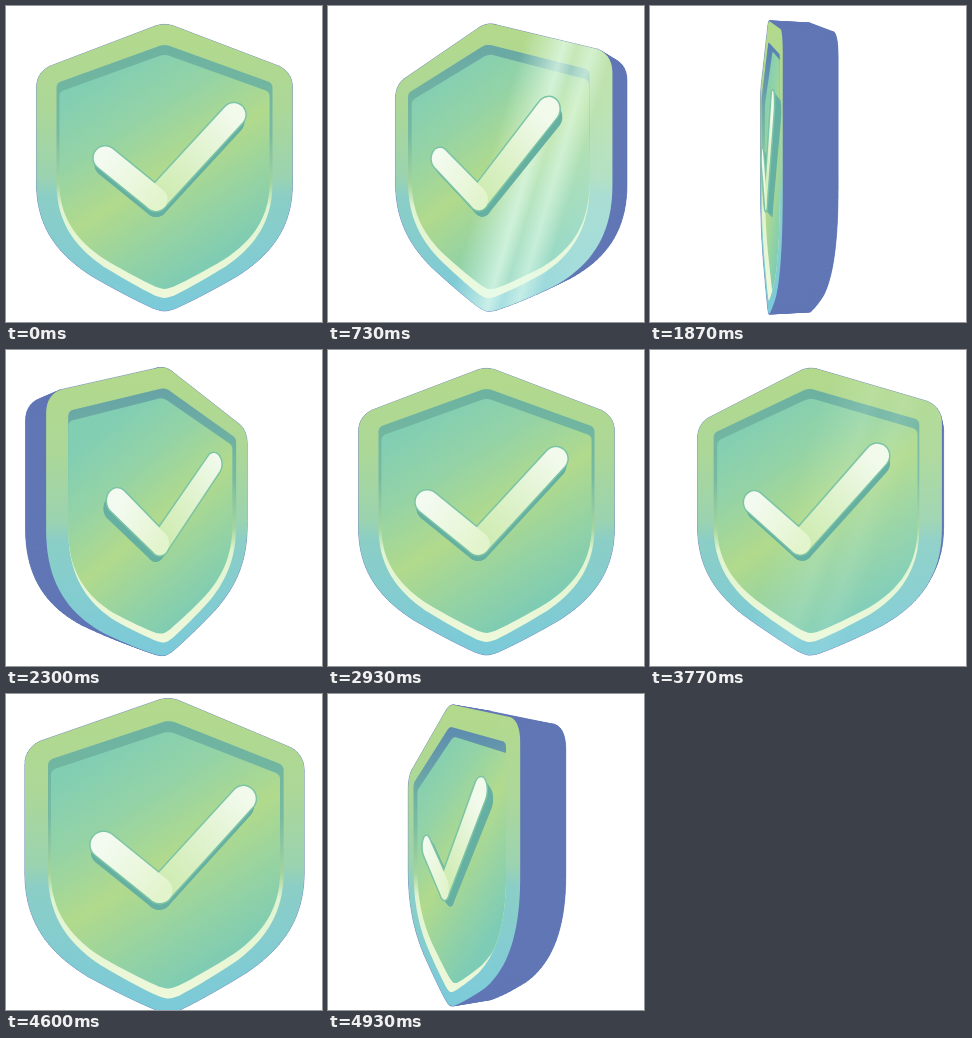
These frames come from a looping animation (316 by 316 pixels, 5 s). An HTML page with a canvas:

```html
<!DOCTYPE html>
<html lang="en">
<head>
<meta charset="utf-8">
<title>Spinning shield</title>
<style>
  html, body { margin: 0; width: 100%; height: 100%; overflow: hidden; background: #fff; }
  canvas { display: block; width: 316px; height: 316px; }
</style>
</head>
<body>
<canvas id="stage"></canvas>
<script>
const SIZE = 316, LOOP = 5000, CYCLE = 3110;
const CX = 158.5, CY = 162, FOCAL = 450, DEPTH = 40, RECESS = 4;
const BLUE = '#6076b5';

const canvas = document.getElementById('stage');
const ctx = canvas.getContext('2d');
const dpr = window.devicePixelRatio || 1;
canvas.width = canvas.height = SIZE * dpr;

// Time in ms and turn in degrees: two full spins, then a rest
const SPIN = [
  [0, 0], [300, 3], [570, 13], [730, 34], [950, 150], [1160, 279], [1300, 314],
  [1520, 360], [1630, 381], [1870, 440], [2080, 570], [2320, 686], [2500, 711],
  [2700, 720], [CYCLE, 720]
];

function slope(i) {
  if (i === 0 || i >= SPIN.length - 2) return 0;
  const a = SPIN[i - 1], b = SPIN[i + 1];
  return (b[1] - a[1]) / (b[0] - a[0]);
}

function spinAt(t) {
  let i = 0;
  while (i < SPIN.length - 2 && t >= SPIN[i + 1][0]) i++;
  const [t0, a] = SPIN[i], [t1, b] = SPIN[i + 1];
  const d = t1 - t0, u = (t - t0) / d, v = 1 - u;
  return a * v * v * (1 + 2 * u) + b * u * u * (3 - 2 * u)
    + d * u * v * (v * slope(i) - u * slope(i + 1));
}

function smooth(from, to, t) {
  const u = Math.min(1, Math.max(0, (t - from) / (to - from)));
  return u * u * (3 - 2 * u);
}

function bezier(out, p, steps = 14) {
  for (let i = 1; i <= steps; i++) {
    const u = i / steps;
    let q = p;
    while (q.length > 1) {
      const from = q;
      q = from.slice(1).map(([x, y], k) => [from[k][0] + (x - from[k][0]) * u, from[k][1] + (y - from[k][1]) * u]);
    }
    out.push(q[0]);
  }
}

// w: half width, top: apex, corner: shoulder height, r: shoulder rounding
function shield(w, top, corner, bottom, r, tip) {
  const m = (corner - top) / w;
  const half = [[0, top + tip * m / 2]];
  bezier(half, [half[0], [tip / 2, top + tip * m / 2], [tip, top + tip * m]], 5);
  const bend = [w - r, corner - r * m];
  bezier(half, [bend, [w, corner], [w, corner + r]], 8);
  half.push([w, 15]);
  const hip = [0.57 * w, 0.755 * bottom], end = [0.09 * w, 0.98 * bottom];
  bezier(half, [[w, 15], [w, 0.41 * bottom], [0.84 * w, 0.6 * bottom], hip], 20);
  bezier(half, [hip, [0.3 * w, 0.895 * bottom], end], 8);
  bezier(half, [end, [0.03 * w, bottom], [0, bottom]], 4);
  return half.concat(half.slice(1, -1).reverse().map(([x, y]) => [-x, y]));
}

function capsule(x0, y0, x1, y1, r) {
  const a = Math.atan2(y1 - y0, x1 - x0), pts = [];
  for (let i = 0; i <= 33; i++) {
    const far = i <= 16;
    const s = a - Math.PI / 2 + (far ? i : i - 1) * Math.PI / 16;
    pts.push([(far ? x1 : x0) + r * Math.cos(s), (far ? y1 : y0) + r * Math.sin(s)]);
  }
  return pts;
}

const outer = shield(128, -145.5, -97, 143, 17, 10);
const opening = shield(108, -124, -85, 130, 5, 6);
const panel = shield(106, -115, -77, 122, 5, 6);
const arms = [capsule(-8.5, 31, 69, -53, 11.5), capsule(-59, -10, -8.5, 31, 11.5)];

let cos = 1, sin = 0;

function project(x, y, z) {
  const k = FOCAL / (FOCAL - x * sin - z * cos);
  return [CX + (x * cos - z * sin) * k, CY + y * k];
}

function polygon(pts) {
  ctx.beginPath();
  pts.forEach(p => ctx.lineTo(p[0], p[1]));
  ctx.closePath();
}

function trace(shape, z, dy = 0) {
  polygon(shape.map(([x, y]) => project(x, y + dy, z)));
}

// Fills the current path with a gradient laid out in the plane at depth z
function fillPlane(z, line, stops) {
  const g = ctx.createLinearGradient(...line);
  stops.forEach(([at, color]) => g.addColorStop(at, color));
  const o = project(0, 0, z), l = project(-60, 0, z), r = project(60, 0, z), d = project(0, 60, z);
  ctx.save();
  ctx.transform((r[0] - l[0]) / 120, 0, 0, (d[1] - o[1]) / 60, o[0], o[1]);
  ctx.fillStyle = g;
  ctx.fill();
  ctx.restore();
}

function drawBody(front) {
  const back = front - DEPTH;
  ctx.fillStyle = ctx.strokeStyle = BLUE;
  ctx.lineWidth = 0.6;
  trace(outer, back);
  ctx.fill();
  outer.forEach(([x, y], i) => {
    const [nx, ny] = outer[(i + 1) % outer.length];
    polygon([project(x, y, front), project(nx, ny, front), project(nx, ny, back), project(x, y, back)]);
    ctx.fill();
    ctx.stroke();
  });
}

function drawFace(z) {
  trace(outer, z);
  fillPlane(z, [0, -143, 0, 143], [
    [0, '#b3d98b'], [0.3, '#abd798'], [0.53, '#9bd3b0'], [0.6, '#8bcec6'], [1, '#7bcada']
  ]);

  ctx.save();
  trace(opening, z);
  fillPlane(z, [0, -124, 0, 130], [
    [0, '#6db2a0'], [0.35, '#76baa2'], [0.55, '#a4d49c'], [0.64, '#e0f4d0'], [1, '#eef8da']
  ]);
  const tint = 0.9 * Math.abs(sin) ** 3;
  fillPlane(z, [0, -124, 0, -40], [[0, `rgba(84,116,184,${tint})`], [1, 'rgba(84,116,184,0)']]);
  ctx.clip();
  trace(panel, z - RECESS);
  fillPlane(z - RECESS, [-60, -96, 60, 96], [
    [0, '#82ceb3'], [0.25, '#94d3a6'], [0.52, '#b1da8c'], [0.78, '#93d2a4'], [1, '#7ccbb5']
  ]);
  ctx.restore();
}

function drawShine(z, deg) {
  const turn = deg % 360;
  const k = Math.exp(-(((turn - 36) / 14) ** 2));
  if (k < 0.01) return;
  const s = (turn - 34) * 1.5;
  const glow = a => `rgba(228,252,236,${a * k})`;
  trace(outer, z);
  fillPlane(z, [s * 0.94, s * 0.33, (s + 130) * 0.94, (s + 130) * 0.33], [
    [0, glow(0)], [0.2, glow(0.4)], [0.36, glow(0.75)], [0.48, glow(0.42)],
    [0.62, glow(0.7)], [0.8, glow(0.3)], [1, glow(0.35)]
  ]);
}

function drawCheck(z) {
  ctx.fillStyle = '#66b0a2';
  for (let i = 0; i <= 6; i++) {
    arms.forEach(arm => {
      trace(arm, z - RECESS + i, 7 - i * 7 / 6);
      ctx.fill();
    });
  }
  ctx.strokeStyle = '#7cc4a6';
  ctx.lineWidth = 3;
  arms.forEach(arm => {
    trace(arm, z + 2);
    ctx.stroke();
  });
  trace(arms[0], z + 2);
  fillPlane(z + 2, [-2, 26, 69, -53], [[0, '#cfecb2'], [0.4, '#dcf1c8'], [1, '#f2faec']]);
  trace(arms[1], z + 2);
  fillPlane(z + 2, [-59, -10, -8, 34], [[0, '#f3faf0'], [0.6, '#eaf7dc'], [1, '#e2f4cc']]);
}

function draw(now) {
  const t = (now % LOOP) % CYCLE;
  const deg = spinAt(t), rad = deg * Math.PI / 180;
  const front = 40 * (smooth(730, 1120, t) - smooth(1900, 2350, t));
  cos = Math.cos(rad);
  sin = Math.sin(rad);

  ctx.setTransform(dpr, 0, 0, dpr, 0, 0);
  ctx.fillStyle = '#fff';
  ctx.fillRect(0, 0, SIZE, SIZE);
  drawBody(front);
  if (FOCAL * cos > front) {
    drawFace(front);
    drawShine(front, deg);
    drawCheck(front);
  }
}

const start = performance.now();
function tick() {
  draw(performance.now() - start);
  requestAnimationFrame(tick);
}
tick();
</script>
</body>
</html>
```
